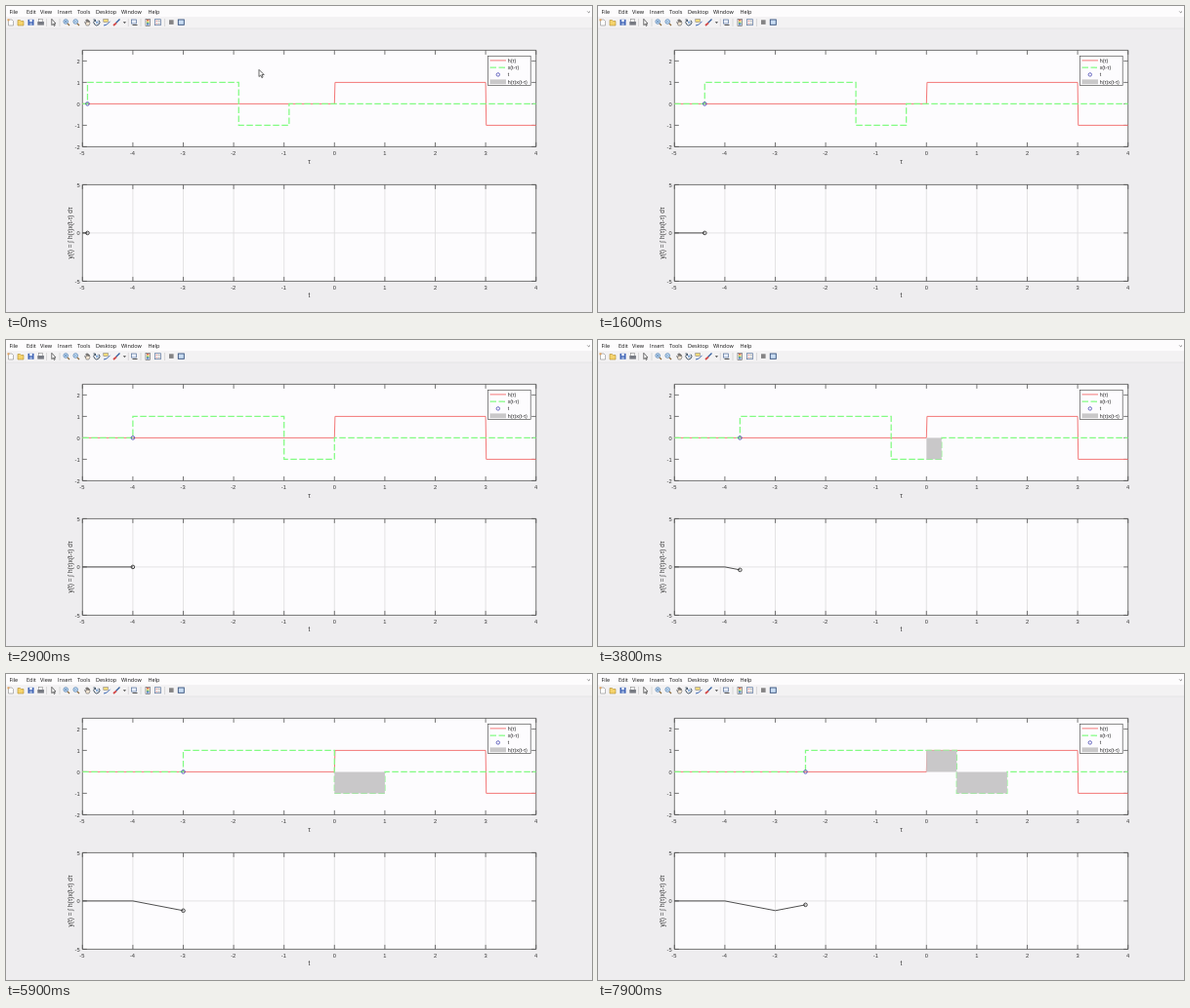
Recreate the animation shown at these times as an HTML page. Size 600 by 314 pixels, loop 8 s.

```html
<!DOCTYPE html>
<html lang="en">
<head>
<meta charset="utf-8">
<title>Convolution</title>
<style>
html, body { margin: 0; width: 100%; height: 100%; overflow: hidden; background: #eeedef; }
svg { display: block; width: 100vw; height: 100vh; }
text { font: 5.7px "Liberation Sans", Arial, sans-serif; fill: #333; }
.menu text { font: 5.5px "Open Sans", sans-serif; fill: #111; }
.legend text { font-size: 5.3px; fill: #222; }
text.label { font-size: 6.5px; }
.h { fill: none; stroke: #f37878; }
.x { fill: none; stroke: #82fb82; stroke-width: 1.25; stroke-dasharray: 6.5 2.5; }
.area { fill: #c9c8c9; }
.y { fill: none; stroke: #3c3c3c; stroke-width: .9; }
.dot { fill: none; stroke-width: .9; }
.axis { fill: none; stroke: #555; stroke-width: .8; }
.grid { stroke: #dedcde; stroke-width: .8; }
</style>
</head>
<body>
<svg id="stage" viewBox="0 0 600 314"></svg>
<script>
const NS = 'http://www.w3.org/2000/svg';
const stage = document.getElementById('stage');

function add(parent, tag, attrs, text) {
  const node = document.createElementNS(NS, tag);
  for (const key in attrs) node.setAttribute(key, attrs[key]);
  if (text !== undefined) node.textContent = text;
  parent.appendChild(node);
  return node;
}
const rect = (p, x, y, width, height, fill, more) =>
  add(p, 'rect', { x, y, width, height, fill, ...more });
const path = (p, d, stroke, more) =>
  add(p, 'path', { d, stroke, fill: 'none', 'stroke-width': 1, ...more });
const circle = (p, cx, cy, r, stroke, more) =>
  add(p, 'circle', { cx, cy, r, stroke, fill: 'none', ...more });
const label = (p, x, y, text, more) => add(p, 'text', { x, y, ...more }, text);

const px = v => 78.3 + 51.6 * (v + 5);
const top1 = v => 100.4 - 22 * v;
const low = v => 232.9 - 9.9 * v;
const line = (pts, fy) => 'M' + pts.map(([x, y]) => px(x).toFixed(2) + ' ' + fy(y).toFixed(2)).join('L');

function drawMenu() {
  const g = add(stage, 'g', { class: 'menu' });
  rect(g, 0, 0, 600, 11.5, '#fdfcfd');
  rect(g, 0, 11.5, 600, 11.5, '#f3f2f3');
  path(g, 'M0 23H600', '#dddcdd', { 'stroke-width': .6 });
  const items = [['File', 3.5], ['Edit', 21], ['View', 35], ['Insert', 53], ['Tools', 73],
    ['Desktop', 92], ['Window', 118], ['Help', 145.5]];
  for (const [name, x] of items) label(g, x, 7.8, name);
  path(g, 'M595.3 5.5L596.6 6.8L598 5.5', '#555', { 'stroke-width': .7 });
}

function drawTools() {
  const g = add(stage, 'g', {});
  for (const x of [41.5, 55, 125.3, 138, 162.5]) path(g, `M${x} 13V21`, '#c8c7c8', { 'stroke-width': .6 });
  // new, open, save, print
  path(g, 'M2.5 14H6L7.5 15.5V20H2.5Z', '#888', { fill: '#fff', 'stroke-width': .6 });
  rect(g, 1.5, 13.3, 2, 2, '#e0a05a');
  path(g, 'M12 20V14.5H14.5L15.5 15.5H18V20Z', '#b08a2c', { fill: '#f5d36c', 'stroke-width': .6 });
  rect(g, 22.5, 13.8, 6, 6, '#3f63b5');
  rect(g, 24, 13.8, 3, 2.5, '#dfe7f8');
  rect(g, 24, 17.5, 3, 2.3, '#9db2dd');
  rect(g, 33.6, 13.6, 4, 3, '#fff', { stroke: '#777', 'stroke-width': .5 });
  rect(g, 32.3, 16, 6.6, 3.6, '#777a82');
  path(g, 'M46.8 13.3V19.7L48.3 18.3L49.3 20.5L50.2 20L49.3 18H51Z', '#333', { fill: '#fff', 'stroke-width': .7 });
  // zoom in and out
  for (const [x, sign] of [[61.2, 'M60 16H62.4M61.2 14.8V17.2'], [71.2, 'M70 16H72.4']]) {
    circle(g, x, 16, 2.3, '#5480b4', { fill: '#d5ebfa', 'stroke-width': .8 });
    path(g, `M${x + 1.7} 17.8L${x + 3.8} 20`, '#8a6a3c', { 'stroke-width': 1.2 });
    path(g, sign, '#2d609f', { 'stroke-width': .6 });
  }
  // pan, rotate, data tip, brush
  path(g, 'M80.5 16.5L82 17.8V14L83 16.5V13.5L84 16.5V14L85 16.8V15L86 17.5L84.8 20H82.3Z', '#444',
    { fill: '#f6e7d5', 'stroke-width': .5 });
  path(g, 'M91 14.5A3 3 0 1 0 95 14.7M89.5 14H91.5V16', '#456', { 'stroke-width': 1 });
  rect(g, 92, 15.5, 2.5, 2.5, '#8fb0d8');
  rect(g, 99.8, 13.5, 4.7, 3, '#f5da7a', { stroke: '#777', 'stroke-width': .5 });
  path(g, 'M100 20Q103.5 20 106.5 15.8', '#3e68b4');
  path(g, 'M112.5 17.5L116.5 13.5', '#355f9e', { 'stroke-width': 1.3 });
  path(g, 'M110 20L113 17.3', '#d34848', { 'stroke-width': 1.8 });
  add(g, 'path', { d: 'M119.8 16.3H123L121.4 18Z', fill: '#444' });
  // link, colour bar, legend, plot tools
  rect(g, 128.5, 14, 5, 4, '#e8eef8', { stroke: '#55709a', 'stroke-width': .7 });
  path(g, 'M129.5 19.5H134.5', '#555');
  rect(g, 143, 13.3, 4.5, 7, '#fff', { stroke: '#555', 'stroke-width': .6 });
  ['#d85e4e', '#e6cf55', '#63b689', '#4872be'].forEach((c, i) => rect(g, 144, 14 + 1.4 * i, 2.5, 1.4, c));
  rect(g, 152.5, 13.7, 6, 6, '#fff', { stroke: '#55709a', 'stroke-width': .7 });
  path(g, 'M153.5 15.3H155M153.5 18H155', '#d35959', { 'stroke-width': .8 });
  path(g, 'M155.5 15.3H157.7M155.5 18H157.7', '#555', { 'stroke-width': .6 });
  rect(g, 167, 14.3, 4.6, 4.6, '#858485');
  rect(g, 176.3, 14, 6, 5.3, '#c8dcf2', { stroke: '#344f7b', 'stroke-width': .9 });
}

function drawAxes(fy, min, max, ticks, grid) {
  const g = add(stage, 'g', {});
  const l = px(-5), r = px(4), t = fy(max), b = fy(min);
  rect(g, l, t, r - l, b - t, '#fdfcfe');
  let d = `M${l} ${t}H${r}V${b}H${l}Z`;
  let inner = '';
  for (let v = -5; v <= 4; v++) {
    const x = px(v);
    d += `M${x} ${b}v-4.5M${x} ${t}v4.5`;
    if (v > -5 && v < 4) inner += `M${x} ${t}V${b}`;
    label(g, v < 0 ? x - .4 : x, b + 8.4, v, { 'text-anchor': 'middle' });
  }
  for (const v of ticks) {
    const y = fy(v);
    d += `M${l} ${y}h4.5M${r} ${y}h-4.5`;
    if (v > min && v < max) inner += `M${l} ${y}H${r}`;
    label(g, 75.6, y + 2.1, v, { 'text-anchor': 'end' });
  }
  if (grid) add(g, 'path', { d: inner, class: 'grid' });
  add(g, 'path', { d, class: 'axis' });
}

function drawLegend() {
  const g = add(stage, 'g', { class: 'legend' });
  rect(g, 493.4, 51.3, 43.8, 30.2, '#fdfcfe', { stroke: '#555', 'stroke-width': .7 });
  path(g, 'M495.5 55.9H512', '', { class: 'h' });
  path(g, 'M495.5 63.2H512', '', { class: 'x' });
  circle(g, 503.8, 70.4, 1.7, '#5555b8', { class: 'dot' });
  rect(g, 495.5, 75.4, 16.5, 4.8, '', { class: 'area' });
  ['h(τ)', 'x(t-τ)', 't', 'h(τ)x(t-τ)'].forEach((s, i) => label(g, 513.7, 57.8 + 7.25 * i, s));
}

drawMenu();
drawTools();
drawAxes(top1, -2, 2.5, [-2, -1, 0, 1, 2], false);
drawAxes(low, -5, 5, [-5, 0, 5], true);
label(stage, 310.5, 161.6, 'τ', { 'text-anchor': 'middle', class: 'label' });
label(stage, 310.5, 299, 't', { 'text-anchor': 'middle', class: 'label' });
label(stage, 0, 0, 'y(t) = ∫ h(τ)x(t-τ) dτ',
  { 'text-anchor': 'middle', class: 'label', transform: 'translate(67.8 233) rotate(-90)' });

const STEP = .012;
add(stage, 'path', { class: 'h',
  d: line([[-5, 0], [0, 0], [STEP, 1], [3, 1], [3 + STEP, -1], [4, -1]], top1) });
const xLine = add(stage, 'path', { class: 'x' });
const dotTop = circle(stage, 0, top1(0), 1.8, '#4a4ab0', { class: 'dot' });
const area = add(stage, 'path', { class: 'area' });
const yLine = add(stage, 'path', { class: 'y' });
const dotLow = circle(stage, 0, 0, 1.8, '#333', { class: 'dot' });
drawLegend();
const cursor = path(stage, 'M0 0V7.2L1.7 5.7L2.9 8.3L4.1 7.7L2.9 5.2H5.2Z', '#444', { fill: '#fff', 'stroke-width': .8 });

const LOOP = 8000;
// each of these moments advances t by 0.1
const STEPS = [300, 600, 900, 1300, 1600, 1900, 2200, 2600, 2900, 3200, 3400, 3800, 4100,
  4400, 4700, 5000, 5300, 5600, 5900, 6200, 6500, 6800, 7200, 7600, 7900];

const box = (a, b, v) => b > a ? line([[a, 0], [a, v], [b, v], [b, 0]], top1) + 'Z' : '';

function render(ms) {
  const t = -4.9 + .1 * STEPS.filter(s => s <= ms).length;
  const flip = t + 3, end = t + 4;
  xLine.setAttribute('d', line([[-5, 0], [t, 0], [t, 1], [flip, 1], [flip, -1],
    [end, -1], [end, 0], [4, 0]], top1));
  area.setAttribute('d', box(0, flip, 1) + box(Math.max(0, flip), end, -1));

  const y = t < -4 ? 0 : t < -3 ? -4 - t : t + 2;
  const pts = [[-5, 0], [-4, 0], [-3, -1]].filter(p => p[0] < t);
  yLine.setAttribute('d', line([...pts, [t, y]], low));
  dotTop.setAttribute('cx', px(t));
  dotLow.setAttribute('cx', px(t));
  dotLow.setAttribute('cy', low(y));

  cursor.setAttribute('transform', `translate(259 ${ms < 200 ? 65.3 : 53.5})`);
  cursor.setAttribute('visibility', ms < 300 ? 'visible' : 'hidden');
}

const start = performance.now();
function tick() {
  render((performance.now() - start) % LOOP);
  requestAnimationFrame(tick);
}
tick();
</script>
</body>
</html>
```
